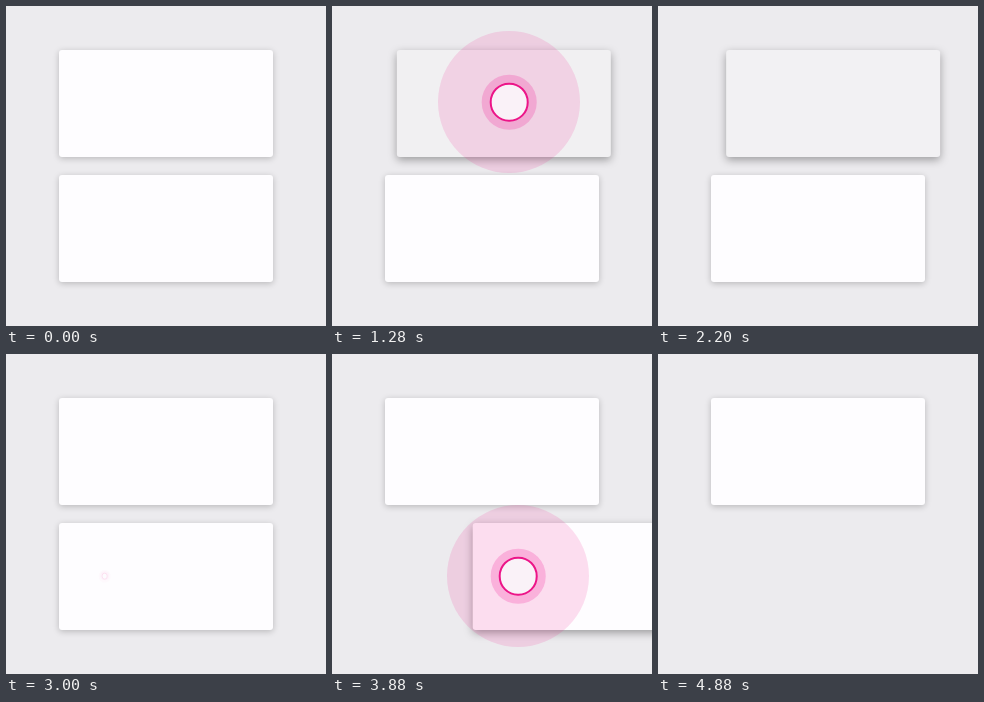
Animation of 320x320 px, one loop 5520 ms. Source, as an HTML page:

```html
<!DOCTYPE html>
<html lang="en">
<head>
<meta charset="utf-8">
<title>Swipe cards</title>
<style>
  html, body { margin: 0; width: 100%; height: 100%; overflow: hidden; background: #ecebee; }
  div { position: absolute; box-sizing: border-box; }
  .card { left: 53.33px; width: 213.33px; height: 106.67px; border-radius: 3px; background: #fefdff; }
  #top { top: 44.44px; }
  #bottom { top: 168.89px; }
  #touch { width: 0; height: 0; }
  #touch div { border-radius: 50%; transform: translate(-50%, -50%); }
  #ripple { background: rgba(240, 20, 135, .135); }
  #halo { background: rgba(240, 20, 145, .22); }
  #ring { background: #faf2f8; border: solid #ec1588; }
</style>
</head>
<body>
<div class="card" id="top"></div>
<div class="card" id="bottom"></div>
<div id="touch"><div id="ripple"></div><div id="halo"></div><div id="ring"></div></div>
<script>
const LOOP = 5520, STEP = 40, START_X = 98.5, TRAVEL = 117.5;
const [topCard, bottomCard, touch, ripple, halo, ring] =
  ['top', 'bottom', 'touch', 'ripple', 'halo', 'ring'].map(id => document.getElementById(id));

const progress = (t, from, to) => Math.min(1, Math.max(0, (t - from) / (to - from)));
const mix = (a, b, p) => a + (b - a) * p;
const smooth = p => p * p * (3 - 2 * p);
const easeOut = p => 1 - (1 - p) ** 2;

// Cubic bezier easing (.15, 0, .24, 1), solved by bisection.
function swipe(x) {
  let low = 0, high = 1;
  for (let i = 0; i < 20; i++) {
    const s = (low + high) / 2, r = 1 - s;
    if (3 * r * r * s * .15 + 3 * r * s * s * .24 + s ** 3 < x) low = s;
    else high = s;
  }
  return smooth(low);
}

function setCard(card, x, lift, grey = 0, tone = 0) {
  const shade = c => mix(c, mix(c - 15, c - 12, tone), grey);
  card.style.transform = `translateX(${x}px)`;
  card.style.background = `rgb(${shade(254)}, ${shade(253)}, ${shade(255)})`;
  card.style.boxShadow =
    `0 ${mix(1.5, 3, lift)}px ${mix(6, 9, lift)}px rgba(0, 0, 0, ${mix(.22, .34, lift)})`;
}

function setCircle(el, radius) {
  el.style.width = el.style.height = 2 * radius + 'px';
}

function setTouch(t, x, y) {
  const leave = 1 - progress(t, 1400, 1640) ** 2;
  const press = easeOut(progress(t, -20, 200)) * leave;
  touch.style.left = x + 'px';
  touch.style.top = y + 'px';
  touch.style.opacity = Math.min(1, progress(t, -20, 140), 1 - progress(t, 1420, 1640));
  setCircle(ripple, 71 * easeOut(progress(t, -20, 420)) * leave);
  setCircle(halo, 27.3 * press);
  setCircle(ring, 19.3 * press);
  ring.style.borderWidth = 2.6 * press + 'px';
}

function draw(now) {
  const t = Math.floor(now % LOOP / STEP) * STEP;
  const first = t - 520, second = t - 3000;
  const moveTop = swipe(progress(first, 275, 1555));
  const moveBottom = swipe(progress(second, 315, 1595));

  // The top card resists and springs back.
  const back = 1 - smooth(progress(first, 1660, 1880));
  setCard(topCard, 15.5 * (1 - (1 - moveTop) ** 1.3) * back,
    progress(first, 120, 340) * back, progress(first, 200, 350) * back, moveTop);

  // The bottom card follows the finger and is thrown out.
  const thrown = progress(second, 1660, 1880);
  setCard(bottomCard, TRAVEL * moveBottom + 170 * thrown ** 1.4, progress(second, 120, 340));

  if (second < -100) setTouch(first, START_X + TRAVEL * moveTop, 96.2);
  else setTouch(second, START_X + TRAVEL * moveBottom, 222);
  requestAnimationFrame(draw);
}
requestAnimationFrame(draw);
</script>
</body>
</html>
```
